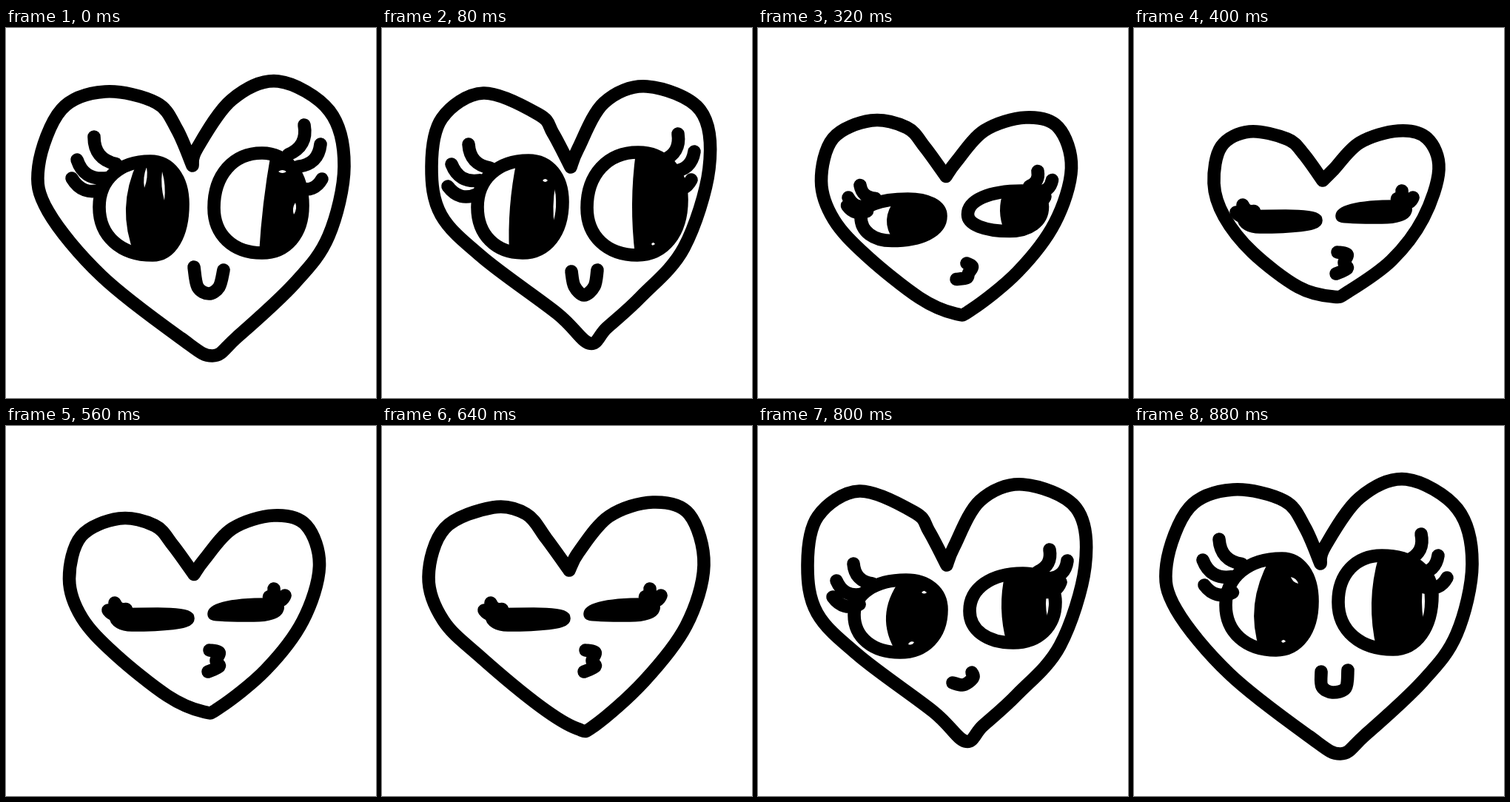
An HTML page that plays this animation: 500x500 px, repeating every 0.96 s.

```html
<!DOCTYPE html>
<html lang="en">
<head>
<meta charset="utf-8">
<title>Heart blowing a kiss</title>
<style>
  html, body { margin: 0; width: 100%; height: 100%; overflow: hidden; background: #fff; }
  svg { display: block; width: 100vw; height: 100vh; }
</style>
</head>
<body>
<svg viewBox="0 0 500 500">
  <g fill="none" stroke="#000" stroke-width="17.6" stroke-linecap="round" stroke-linejoin="round">
    <path id="heart"/>
    <path id="pupils" fill="#000" stroke="none"/>
    <path id="glints" fill="#fff" stroke="none"/>
    <path id="eyes"/>
    <path id="lashes"/>
    <path id="mouth"/>
  </g>
</svg>
<script>
const STEP = 80;
const ROUND = 0.6; // fullness of the eye corners

// Key points from the notch over the left lobe, round the tip and back.
const big = [252,186, 231,137, 203,101, 134,86, 75,110, 44,187, 57,248, 129,335, 236,419,
  279,443, 312,418, 390,345, 436,281, 457,187, 437,112, 368,72, 305,97, 258,163];
const medium = [255,188, 231,142, 212,117, 137,88, 81,122, 67,187, 80,253, 137,311, 237,386,
  280,426, 304,405, 350,363, 408,297, 442,190, 430,111, 358,79, 300,101, 265,163];
const small = [253,195, 222,152, 195,119, 150,110, 85,138, 63,204, 83,263, 134,313, 214,379,
  264,409, 287,405, 354,345, 411,270, 435,188, 415,119, 366,103, 307,122, 266,170];
const tiny = [255,206, 229,170, 207,150, 156,140, 118,160, 108,210, 122,255, 160,303, 222,350,
  269,363, 290,356, 348,314, 391,257, 412,191, 396,149, 357,139, 305,155, 270,191];

// Eye: left, top, right and bottom points, then the pupil edge's x at top, middle and bottom.
// Lashes: three tips per eye. Glints: both ends of each sliver.
const open = {
  left: [126,242, 195,180, 239,238, 198,307, 178,162,174],
  right: [281,243, 346,169, 401,240, 346,304, 358,348,342],
  lashes: [119,147, 96,178, 89,203, 403,131, 425,157, 427,204],
  mouth: [294,327, 288,350, 274,359, 259,350, 254,323],
  glints: [190,188,187,216, 211,194,214,233, 368,194,379,194, 391,236,389,252]
};
const soft = {
  left: [124,242, 200,179, 241,237, 192,303, 184,163,170],
  right: [276,238, 335,175, 403,228, 350,302, 331,321,328],
  lashes: [115,153, 93,181, 95,215, 388,146, 411,175, 423,205],
  mouth: [289,330, 286,354, 268,360, 254,352, 253,332],
  glints: [212,204,222,213, 199,291,205,291, 391,212,391,262]
};
const wide = {
  left: [129,242, 198,179, 244,235, 190,304, 182,173,172],
  right: [277,243, 346,168, 405,232, 345,307, 343,338,342],
  lashes: [117,157, 94,184, 89,214, 400,143, 422,167, 418,205],
  mouth: [291,327, 287,349, 273,361, 260,349, 256,329],
  glints: [217,206,224,206, 234,214,233,268, 364,292,369,292]
};
const sly = {
  left: [130,255, 200,208, 248,248, 192,306, 192,173,187],
  right: [286,250, 358,199, 402,238, 345,293, 334,329,336],
  lashes: [129,186, 106,209, 101,231, 394,167, 418,182, 409,211],
  mouth: [289,333, 291,339, 285,346, 276,350, 263,347],
  glints: [221,225,229,224, 203,295,211,292, 391,222,391,258]
};
const shut = {
  left: [148,256, 205,254, 246,260, 170,269, 180,175,180],
  right: [281,254, 355,241, 367,245, 335,256, 330,325,330],
  lashes: [147,239, 138,249, 140,249, 362,220, 377,229, 367,245],
  mouth: [275,303, 288,306, 284,317, 288,325, 273,332],
  glints: []
};

const lerp = (a, b, k) => a + (b - a) * k;
const mix = (a, b, k = 0.5) => a.map((v, i) => lerp(v, b[i], k));

function mixFace(a, b) {
  const face = { glints: [] };
  for (const part of ['left', 'right', 'lashes', 'mouth']) face[part] = mix(a[part], b[part]);
  return face;
}

function group(list, size) {
  const out = [];
  for (let i = 0; i < list.length; i += size) out.push(list.slice(i, i + size));
  return out;
}

// Smooth line through key points.
function curve(pts) {
  const at = i => pts[Math.max(0, Math.min(pts.length - 1, i))];
  let d = 'M' + pts[0];
  for (let i = 0; i < pts.length - 1; i++) {
    const [p, q, r, s] = [at(i - 1), at(i), at(i + 1), at(i + 2)];
    const c1 = q.map((v, j) => v + (r[j] - p[j]) / 6);
    const c2 = r.map((v, j) => v - (s[j] - q[j]) / 6);
    d += `C${c1} ${c2} ${r}`;
  }
  return d;
}

// Quarter of an egg; upright ones leave vertically and arrive level.
function quarter([x0, y0], [x1, y1], upright) {
  return upright
    ? `C${x0},${lerp(y0, y1, ROUND)} ${lerp(x1, x0, ROUND)},${y1} ${x1},${y1}`
    : `C${lerp(x0, x1, ROUND)},${y0} ${x1},${lerp(y1, y0, ROUND)} ${x1},${y1}`;
}

function outline(eye) {
  const [l, t, r, b] = group(eye, 2);
  return 'M' + l + quarter(l, t, true) + quarter(t, r) + quarter(r, b, true) + quarter(b, l) + 'z';
}

function pupil(eye) {
  const [, t, r, b] = group(eye, 2);
  const [top, mid, bottom] = eye.slice(8);
  const bow = 2 * mid - (top + bottom) / 2;
  return `M${top},${t[1]}Q${bow},${(t[1] + b[1]) / 2} ${bottom},${b[1]}L${b}`
    + quarter(b, r) + quarter(r, t, true) + 'z';
}

// A lash reaches towards the middle of its eye and sags outwards.
function lash([x, y], eye, side) {
  const dx = ((eye[2] + eye[6]) / 2 - x) * 0.38;
  const dy = ((eye[3] + eye[7]) / 2 - y) * 0.38;
  const sag = 0.4 * side;
  return `M${x},${y}q${dx / 2 - dy * sag},${dy / 2 + dx * sag} ${dx},${dy}`;
}

function sliver([x0, y0, x1, y1]) {
  const size = Math.hypot(x1 - x0, y1 - y0);
  const nx = (y0 - y1) / size * 4, ny = (x1 - x0) / size * 4;
  const mx = (x0 + x1) / 2, my = (y0 + y1) / 2;
  return `M${x0},${y0}Q${mx + nx},${my + ny} ${x1},${y1}Q${mx - nx},${my - ny} ${x0},${y0}z`;
}

function pose([heart, face]) {
  const { left, right } = face;
  const pts = group(heart, 2);
  return {
    heart: curve([...pts, pts[0]]),
    eyes: outline(left) + outline(right),
    pupils: pupil(left) + pupil(right),
    lashes: group(face.lashes, 2)
      .map((tip, i) => i < 3 ? lash(tip, left, 1) : lash(tip, right, -1)).join(''),
    mouth: curve(group(face.mouth, 2)),
    glints: group(face.glints, 4).map(sliver).join('')
  };
}

const between = mix(medium, small);
const shrinking = mix(small, tiny);
const squeezed = mix(tiny, small, -0.06);
const drowsy = mixFace(sly, shut);

const poses = [
  [big, open], [medium, wide], [between, mixFace(wide, sly)], [small, sly],
  [shrinking, drowsy], [tiny, shut], [squeezed, shut], [shrinking, shut],
  [small, shut], [between, drowsy], [medium, sly], [big, soft]
].map(pose);

let shown = -1;

function draw(time) {
  const i = Math.floor(time / STEP) % poses.length;
  if (i === shown) return;
  shown = i;
  for (const id in poses[i]) document.getElementById(id).setAttribute('d', poses[i][id]);
}

const start = performance.now();
function tick() {
  draw(performance.now() - start);
  requestAnimationFrame(tick);
}
tick();
</script>
</body>
</html>
```
